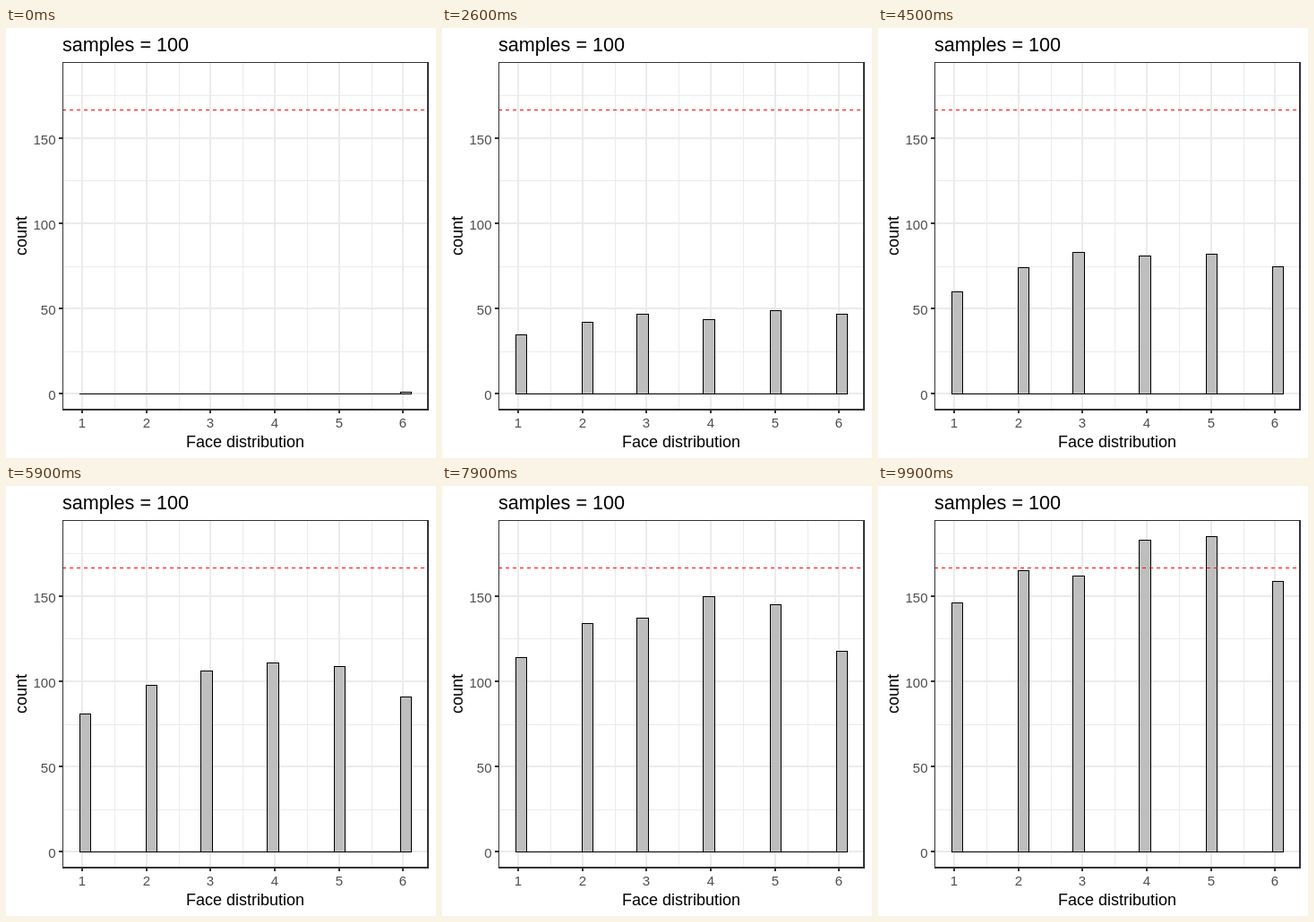
Write an HTML page that moves like this. It is 480 px wide and 480 px high and loops after 10 s.

```html
<!DOCTYPE html>
<html lang="en">
<head>
<meta charset="utf-8">
<title>Face distribution</title>
<style>
  html, body { margin: 0; height: 100%; overflow: hidden; background: #fff; }
  svg { display: block; width: 480px; height: 480px; font-family: "Liberation Sans", Arial, sans-serif; }
  rect, path { shape-rendering: crispEdges; }
  .tick { font-size: 15px; fill: #4d4d4d; }
  .axis { font-size: 18px; text-anchor: middle; }
  .bar { fill: #bebebe; stroke: #000; }
</style>
</head>
<body>
<svg id="chart" viewBox="0 0 480 480">
  <text x="63" y="26" font-size="21.6">samples = 100</text>
  <text class="axis" x="267" y="468">Face distribution</text>
  <text class="axis" transform="translate(23 232) rotate(-90)">count</text>
</svg>
<script>
const chart = document.getElementById('chart');
const STEP = 100, STEPS = 100;
const GRID = '#ebebeb', DARK = '#333';
const BIN = 12.34, BIN_LEFT = 81.7;

// Each face's count follows a line through its values at these steps
const STOPS = [0, 16, 36, 59, 79, 99];
const FACES = [
  [0, 22, 47, 81, 114, 146],
  [0, 26, 58, 98, 134, 165],
  [0, 24, 69, 106, 137, 162],
  [0, 27, 61, 111, 150, 183],
  [0, 33, 65, 109, 145, 185],
  [1, 30, 64, 91, 118, 159]
];

const faceX = face => 85.15 + (face - 1) * 71.65;
const xAt = face => Math.round(faceX(face));
const yAt = count => Math.round(408.4 - count * 1.905);

function add(tag, attrs, text = '') {
  const el = document.createElementNS('http://www.w3.org/2000/svg', tag);
  for (const name in attrs) el.setAttribute(name, attrs[name]);
  el.textContent = text;
  return chart.appendChild(el);
}

const box = (x, y, width, height, fill) => add('rect', { x, y, width, height, fill });

// Minor grid, then major grid with ticks and labels
for (let f = 1.5; f < 6; f++) box(xAt(f), 38, 1, 388, GRID);
for (let c = 25; c < 200; c += 50) box(63, yAt(c), 408, 1, GRID);
for (let f = 1; f <= 6; f++) {
  const x = xAt(f);
  box(x - 1, 38, 2, 388, GRID);
  box(x - 1, 427, 2, 3, DARK);
  add('text', { class: 'tick', x, y: 446, 'text-anchor': 'middle' }, f);
}
for (let c = 0; c <= 150; c += 50) {
  const y = yAt(c);
  box(63, y - 1, 408, 2, GRID);
  box(59, y - 1, 4, 2, DARK);
  add('text', { class: 'tick', x: 55.5, y: y + 7, 'text-anchor': 'end' }, c);
}

// Each bar fills the histogram bin that holds its face
const bars = FACES.map((_, i) => {
  const bin = Math.floor((faceX(i + 1) - BIN_LEFT) / BIN);
  const left = Math.round(BIN_LEFT + bin * BIN);
  const right = Math.round(BIN_LEFT + (bin + 1) * BIN);
  return add('rect', { class: 'bar', x: left + 0.5, width: right - left });
});
box(82, 408, 371, 1, '#000');
add('path', { d: 'M63 91.5H471', stroke: '#f00', 'stroke-dasharray': '4 4' });

// Panel border
box(63, 38, 408, 1, DARK);
box(63, 38, 1, 389, DARK);
box(470, 38, 2, 389, DARK);
box(63, 425, 409, 2, DARK);

function countAt(values, step) {
  const i = Math.max(1, STOPS.findIndex(stop => stop >= step));
  const part = (step - STOPS[i - 1]) / (STOPS[i] - STOPS[i - 1]);
  return Math.round(values[i - 1] + (values[i] - values[i - 1]) * part);
}

function draw() {
  const step = Math.floor(performance.now() / STEP) % STEPS;
  bars.forEach((bar, i) => {
    const top = yAt(countAt(FACES[i], step));
    bar.setAttribute('y', top + 0.5);
    bar.setAttribute('height', 408 - top);
  });
  requestAnimationFrame(draw);
}
draw();
</script>
</body>
</html>
```
